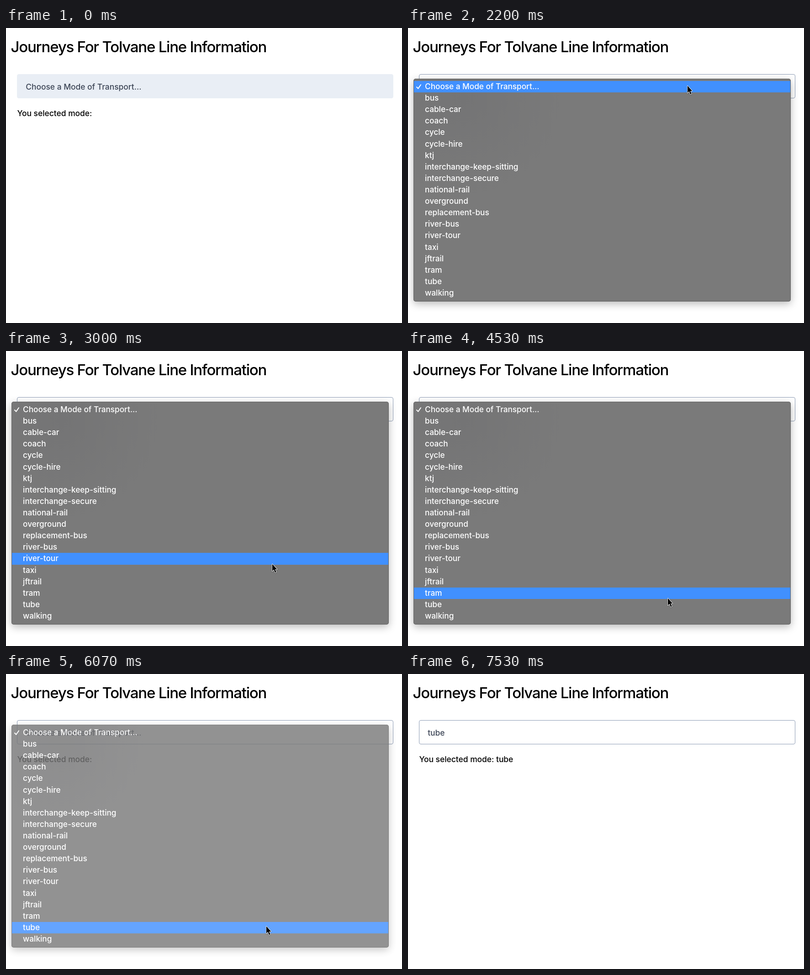
Write an HTML page that moves like this. It is 867 px wide and 646 px high and loops after 7.59 s.

```html
<!DOCTYPE html>
<html lang="en">
<head>
<meta charset="utf-8">
<title>Line Information</title>
<style>
  html, body { margin: 0; width: 100%; height: 100%; overflow: hidden; background: #fff; }
  body { position: relative; font: 450 17.4px Inter, "Open Sans", sans-serif; color: #000; white-space: pre; }
  h1, #select, #result, #menu, #cursor { position: absolute; box-sizing: border-box; margin: 0; }
  h1 { left: 10.5px; top: 21px; font-size: 33px; font-weight: 450; line-height: 40px; letter-spacing: -0.037em; }
  #select {
    left: 24px; top: 101px; width: 824px; height: 53px; padding-left: 18.2px;
    border: 1px solid #e9eef5; border-radius: 4px; background: #e9eef5;
    line-height: 53px; color: #3c4556;
  }
  #select.focus { background: #fff; border-color: #8c9bb4; }
  #result { left: 24.4px; top: 174px; line-height: 26px; }
  #menu {
    left: 12px; top: 111px; width: 826px; height: 488px; padding-top: 5px;
    border-radius: 5px; color: #fff; font-size: 17.2px; font-weight: 500;
    background: radial-gradient(circle at 110px 40px, #747475, #7a7a7a 220px);
    box-shadow: inset 0 0 0 1px #606060, 0 5px 18px rgba(0, 0, 0, .28);
  }
  .row { height: 25.12px; line-height: 23.2px; padding-left: 24.6px; margin: 0 1px 0 .5px; }
  .row.on { background: #4190fe; }
  #menu svg { position: absolute; left: 5px; top: 11px; }
  #cursor { left: 0; top: 0; overflow: visible; filter: drop-shadow(0 1px 1px rgba(0, 0, 0, .3)); }
</style>
</head>
<body>
<h1>Journeys For Tolvane Line Information</h1>
<div id="select"></div>
<div id="result"></div>
<div id="menu">
  <svg width="14" height="14"><path d="M2 7.2 L5.2 10.6 L11 2.2" fill="none" stroke="#fff" stroke-width="2" stroke-linecap="round" stroke-linejoin="round"/></svg>
</div>
<svg id="cursor" width="14" height="24"><path d="M0 0 V15.6 L3.5 12.3 L6.2 18.8 L8.7 17.7 L6 11.4 H10.4 Z" fill="#000" stroke="#fff" stroke-width="1.6" paint-order="stroke" stroke-linejoin="round"/></svg>
<script>
const LOOP = 7590, STEP = 200 / 3;
const PROMPT = 'Choose a Mode of Transport...';
const MODES = [PROMPT, ...('bus cable-car coach cycle cycle-hire ktj interchange-keep-sitting ' +
  'interchange-secure national-rail overground replacement-bus river-bus river-tour ' +
  'taxi jftrail tram tube walking').split(' ')];
const ROW_TOP = 116, ROW_H = 25.12;

// time, x, y of the pointer tip
const PATH = [
  [667, 868, -6], [1400, 612, 126], [2400, 612, 126], [3000, 583, 466],
  [3200, 574, 469], [3400, 573, 470], [3667, 573, 470], [4467, 570, 540],
  [4533, 569, 541], [5067, 569, 541], [5400, 570, 552], [7400, 570, 552], [7467, 705, 414]
];
const SHOW = 730, FOCUS = 1395, OPEN = 1460, CLOSE = 6260, HIDE = 7530;
const BLINK = [5730, 5795];
const FADE_START = 5960, FADE_END = 6262;

const $ = id => document.getElementById(id);
const select = $('select'), result = $('result'), menu = $('menu'), cursor = $('cursor');

const rows = MODES.map(name => {
  const row = document.createElement('div');
  row.className = 'row';
  row.textContent = name;
  menu.append(row);
  return row;
});
// drop markup whitespace, which white-space: pre would lay out
for (const node of [...menu.childNodes]) if (node.nodeType === 3) node.remove();

const ease = p => p * p * (3 - 2 * p);

function pointer(t) {
  const i = PATH.findIndex(k => k[0] > t);
  if (i < 0) return PATH[PATH.length - 1].slice(1);
  if (i === 0) return PATH[0].slice(1);
  const [t0, x0, y0] = PATH[i - 1], [t1, x1, y1] = PATH[i];
  const p = ease((t - t0) / (t1 - t0));
  return [x0 + (x1 - x0) * p, y0 + (y1 - y0) * p];
}

function menuAlpha(t) {
  if (t < OPEN || t >= CLOSE) return 0;
  const p = Math.min(1, Math.max(0, (t - FADE_START) / (FADE_END - FADE_START)));
  return 1 - Math.pow(p, 1.62);
}

function render(ms) {
  // the screen updates fifteen times a second
  const t = Math.floor((ms + 4) / STEP) * STEP + .5;
  const [x, y] = pointer(t);
  const chosen = t >= CLOSE;

  select.classList.toggle('focus', t >= FOCUS);
  select.textContent = chosen ? 'tube' : PROMPT;
  result.textContent = 'You selected mode:' + (chosen ? ' tube' : '');

  const alpha = menuAlpha(t);
  menu.style.visibility = alpha ? 'visible' : 'hidden';
  menu.style.opacity = alpha;
  const blink = t >= BLINK[0] && t < BLINK[1];
  const active = blink ? -1 : Math.floor((y - ROW_TOP) / ROW_H);
  rows.forEach((row, i) => row.classList.toggle('on', i === active));

  cursor.style.visibility = t >= SHOW && t < HIDE ? 'visible' : 'hidden';
  cursor.style.transform = `translate(${x.toFixed(1)}px, ${(y + .5).toFixed(1)}px)`;
}

let start = null;
function tick(now) {
  if (start === null) start = now;
  render((now - start) % LOOP);
  requestAnimationFrame(tick);
}
render(0);
requestAnimationFrame(tick);
</script>
</body>
</html>
```
